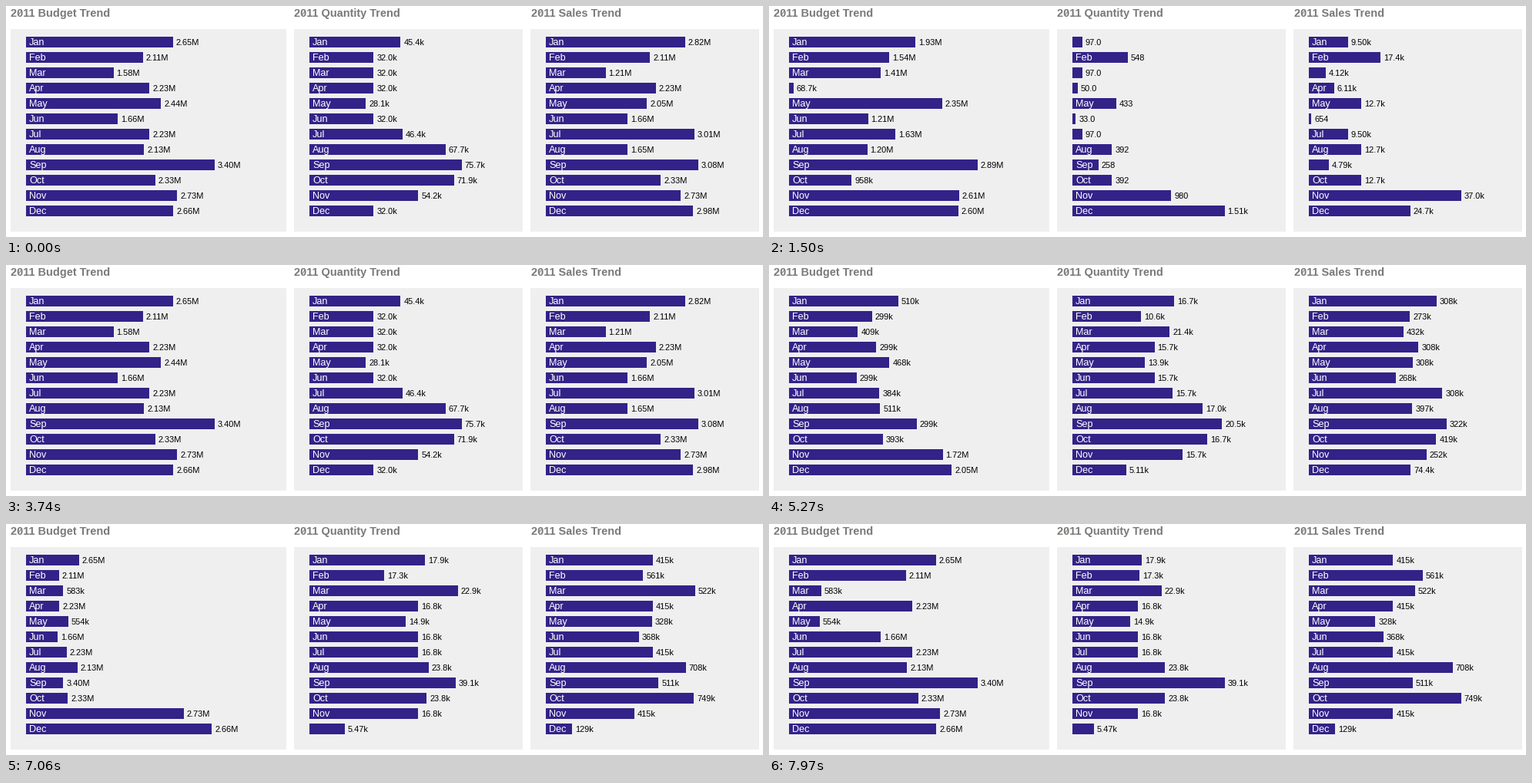
A matplotlib script for the animation above (8 s loop, 983 by 301 pixels).

```python
import matplotlib.pyplot as plt
from matplotlib.animation import FuncAnimation
from matplotlib.patches import Rectangle

W, H, DPI = 983, 301, 64
LOOP, TICK = 8000, 20
EASE_MS = 1000

BAR, PANEL, TITLE = "#332288", "#efefef", "#7b7a78"
MONTHS = "Jan Feb Mar Apr May Jun Jul Aug Sep Oct Nov Dec".split()
ROW_TOP, ROW_STEP, BAR_H = 40, 20, 14
MIN_LABELED = 31  # narrower bars lose their month name
K, M = 1e3, 1e6

# title, title x, panel x, panel width, bar x, longest bar
CHARTS = [
    ("2011 Budget Trend", 6, 6, 358, 26, 244.5),
    ("2011 Quantity Trend", 374.5, 374, 297, 394, 197.5),
    ("2011 Sales Trend", 681.5, 681, 297, 701, 197.5),
]


def year(level, unit, **peaks):
    """Every month sits at the usual level except the ones that stand out."""
    return {m: peaks.get(m, level) * unit for m in MONTHS}


def like(base, factor, unit, **peaks):
    """A scaled copy of another year with its own months that stand out."""
    scaled = {m: v * factor for m, v in base.items()}
    return scaled | {m: v * unit for m, v in peaks.items()}


budget = year(2.23, M, Jan=2.65, Feb=2.11, Mar=1.58, May=2.44, Jun=1.66,
              Aug=2.13, Sep=3.40, Oct=2.33, Nov=2.73, Dec=2.66)
quantity = year(32, K, Jan=45.4, May=28.1, Jul=46.4, Aug=67.7, Sep=75.7,
                Oct=71.9, Nov=54.2)
sales = like(budget, 1, M, Jan=2.82, Mar=1.21, May=2.05, Jul=3.01, Aug=1.65,
             Sep=3.08, Dec=2.98)
full = [budget, quantity, sales]

small = [
    like(budget, 0.73, M, Mar=1.41, Apr=0.0687, May=2.35, Aug=1.20, Sep=2.89,
         Oct=0.958, Nov=2.61, Dec=2.60),
    year(97, 1, Feb=548, Apr=50, May=433, Jun=33, Aug=392, Sep=258, Oct=392,
         Nov=980, Dec=1510),
    year(12.7, K, Jan=9.5, Feb=17.4, Mar=4.12, Apr=6.11, Jun=0.654, Jul=9.5,
         Sep=4.79, Nov=37, Dec=24.7),
]

region = [
    year(299, K, Jan=510, Mar=409, May=468, Jul=384, Aug=511, Oct=393,
         Nov=1720, Dec=2050),
    year(15.7, K, Jan=16.7, Feb=10.6, Mar=21.4, May=13.9, Aug=17, Sep=20.5,
         Oct=16.7, Dec=5.11),
    year(308, K, Feb=273, Mar=432, Jun=268, Aug=397, Sep=322, Oct=419,
         Nov=252, Dec=74.4),
]

mixed = [
    like(budget, 1, K, Mar=583, May=554),
    like(region[1], 1.07, K, Feb=17.3, Aug=23.8, Sep=39.1, Oct=23.8),
    year(415, K, Feb=561, Mar=522, May=328, Jun=368, Aug=708, Sep=511,
         Oct=749, Dec=129),
]

# first visible step, start of the easing, time between redraws
MOVES = [(500, 330, 77), (2810, 2658, 77), (4980, 4813, 72), (7060, 6813, 76)]


def short(value):
    """Three digits with a k or M suffix."""
    for unit, suffix in ((M, "M"), (K, "k"), (1, "")):
        if value >= unit:
            return f"{value / unit:#.3g}".rstrip(".") + suffix


def build_state(years):
    """Return the value texts and bar widths of all three charts."""
    texts, widths = [], []
    for data, chart in zip(years, CHARTS):
        top = max(data.values())
        texts += [short(data[m]) for m in MONTHS]
        widths += [data[m] / top * chart[5] for m in MONTHS]
    return texts, widths


STATES = [build_state(s) for s in (full, small, full, region, mixed)]


def cubic_in_out(t):
    t = min(max(t, 0), 1)
    return 4 * t ** 3 if t < 0.5 else 1 - 4 * (1 - t) ** 3


def moment(ms):
    """Return the index of the current state and its easing progress."""
    index, progress = 0, 1
    for i, (shown, start, step) in enumerate(MOVES, 1):
        if ms >= shown:
            held = shown + (ms - shown) // step * step
            index, progress = i, cubic_in_out((held - start) / EASE_MS)
    return index, progress


fig = plt.figure(figsize=(W / DPI, H / DPI), dpi=DPI, facecolor="white")
ax = fig.add_axes([0, 0, 1, 1])
ax.set_xlim(0, W)
ax.set_ylim(H, 0)
ax.axis("off")


def write(x, y, text, px, color, weight="normal"):
    return ax.text(x, y, text, fontsize=px * 72 / DPI, color=color,
                   weight=weight, family="Liberation Sans", va="baseline")


def box(x, y, w, h, color):
    return ax.add_patch(Rectangle((x, y), w, h, facecolor=color, linewidth=0))


bars, names, values = [], [], []
for title, title_x, panel_x, panel_w, bar_x, _ in CHARTS:
    write(title_x, 14, title, 14.5, TITLE, "bold")
    ax.plot([title_x + 10.6, title_x + 13.4], [11.2, 6.8],
            color=TITLE, linewidth=0.9 * 72 / DPI)  # slashed zero
    box(panel_x, 30, panel_w, 264, PANEL)
    for row, month in enumerate(MONTHS):
        y = ROW_TOP + row * ROW_STEP
        bars.append(box(bar_x, y, 0, BAR_H, BAR))
        names.append(write(bar_x + 4, y + 11, month, 12.6, "white"))
        values.append(write(bar_x, y + 11, "", 11, "black"))


def draw(frame):
    index, p = moment(frame * TICK + TICK / 2)
    texts, goal = STATES[index]
    before = STATES[max(index - 1, 0)][1]
    for i, bar in enumerate(bars):
        width = before[i] + (goal[i] - before[i]) * p
        bar.set_width(width)
        names[i].set_visible(goal[i] >= MIN_LABELED)
        values[i].set_text(texts[i])
        values[i].set_x(bar.get_x() + width + 4)
    return bars + names + values


anim = FuncAnimation(fig, draw, frames=LOOP // TICK, interval=TICK,
                     init_func=lambda: draw(0), repeat=True, repeat_delay=0)
plt.show()
```
